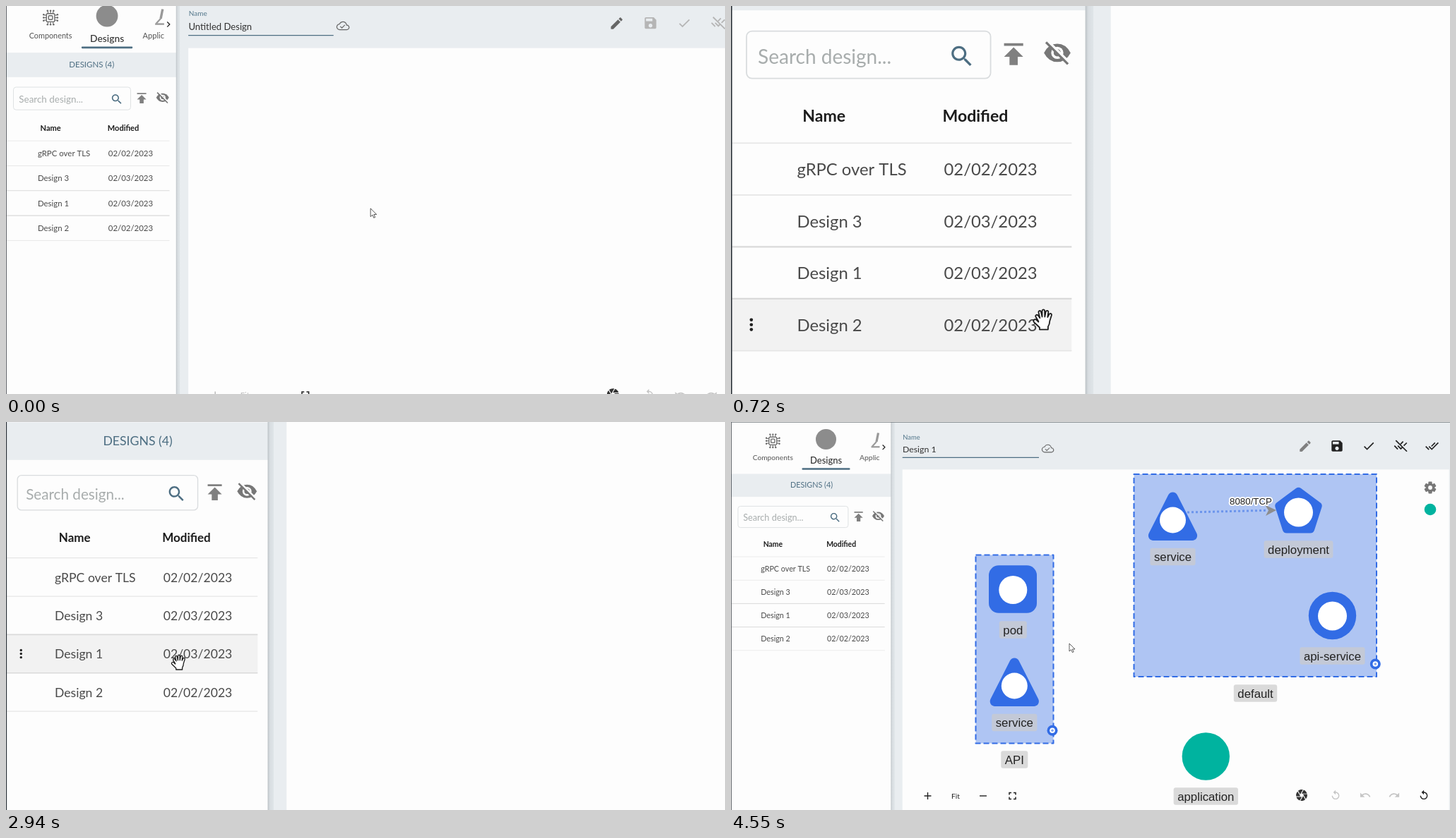
Write an HTML page with a canvas that moves like this. It is 1018 px wide and 550 px high and loops after 4610 ms.

```html
<!DOCTYPE html>
<html lang="en">
<head>
<meta charset="utf-8">
<title>Opening a design</title>
<style>
html, body { margin: 0; width: 100%; height: 100%; overflow: hidden; background: #fdfdfd; }
canvas { display: block; width: 1018px; height: 550px; }
</style>
</head>
<body>
<canvas id="stage" width="1018" height="550"></canvas>
<script>
const ctx = document.getElementById('stage').getContext('2d');
const LOOP = 4610, MAX_ZOOM = 2.288, PIVOT_Y = 188.3, LOADED_AT = 3880;
const SANS = 'Lato, sans-serif', ARIAL = '"Liberation Sans", Arial, sans-serif';
const DARK = '#222', FADED = '#c6c6c6', SLATE = '#4d6e82', BAND = '#e9edf0', BLUE = '#326ce5', TEAL = '#00b39f';

// Icons on a 24 unit grid
const icons = {
  search: 'M15.5 14h-.79l-.28-.27C15.41 12.59 16 11.11 16 9.5 16 5.91 13.09 3 9.5 3S3 5.91 3 9.5 5.91 16 9.5 16c1.61 0 3.09-.59 4.23-1.57l.27.28v.79l5 4.99L20.49 19l-4.99-5zm-6 0C7.01 14 5 11.99 5 9.5S7.01 5 9.5 5 14 7.01 14 9.5 11.99 14 9.5 14z',
  publish: 'M5 4v2h14V4H5zm0 10h4v6h6v-6h4l-7-7-7 7z',
  save: 'M17 3H5c-1.11 0-2 .9-2 2v14c0 1.1.89 2 2 2h14c1.1 0 2-.9 2-2V7l-4-4zm-5 16c-1.66 0-3-1.34-3-3s1.34-3 3-3 3 1.34 3 3-1.34 3-3 3zm3-10H5V5h10v4z',
  edit: 'M3 17.25V21h3.75L17.81 9.94l-3.75-3.75L3 17.25zM20.71 7.04c.39-.39.39-1.02 0-1.41l-2.34-2.34c-.39-.39-1.02-.39-1.41 0l-1.83 1.83 3.75 3.75 1.83-1.83z',
  check: 'M9 16.17 4.83 12l-1.42 1.41L9 19 21 7l-1.41-1.41z',
  checkAll: 'M18 7l-1.41-1.41-6.34 6.34 1.41 1.41L18 7zm4.24-1.41L11.66 16.17 7.48 12l-1.41 1.41L11.66 19l12-12-1.42-1.41zM.41 13.41L6 19l1.41-1.41L1.83 12 .41 13.41z',
  uncheckAll: 'M4.84 1.98L3.43 3.39l10.38 10.38-1.41 1.41-4.24-4.24-1.41 1.41 5.66 5.66 2.83-2.83 6.6 6.6 1.41-1.41L4.84 1.98zM18.05 12.36L23 7.4 21.57 6l-4.94 4.94 1.42 1.42zm-1.06-7.08l-1.41-1.41-4.24 4.24 1.41 1.41 4.24-4.24zM1.08 12.35l5.66 5.66 1.41-1.41-5.66-5.66-1.41 1.41z',
  undo: 'M12.5 8c-2.65 0-5.05.99-6.9 2.6L2 7v9h9l-3.62-3.62c1.39-1.16 3.16-1.88 5.12-1.88 3.54 0 6.55 2.31 7.6 5.5l2.37-.78C21.08 11.03 17.15 8 12.5 8z',
  replay: 'M12 5V1L7 6l5 5V7c3.31 0 6 2.69 6 6s-2.69 6-6 6-6-2.69-6-6H4c0 4.42 3.58 8 8 8s8-3.58 8-8-3.58-8-8-8z',
  expand: 'M7 14H5v5h5v-2H7v-3zm-2-4h2V7h3V5H5v5zm12 7h-3v2h5v-5h-2v3zM14 5v2h3v3h2V5h-5z',
  plus: 'M19 13h-6v6h-2v-6H5v-2h6V5h2v6h6v2z',
  minus: 'M19 13H5v-2h14v2z',
  chevron: 'M10 6 8.59 7.41 13.17 12l-4.58 4.59L10 18l6-6z',
  shutter: 'M9.4 10.5l4.77-8.26C13.47 2.09 12.75 2 12 2c-2.4 0-4.6.85-6.32 2.25l3.66 6.35.06-.1zM21.54 9c-.92-2.92-3.15-5.26-6-6.34L11.88 9h9.66zm.26 1h-7.49l.29.5 4.76 8.25C21 16.97 22 14.61 22 12c0-.69-.07-1.35-.2-2zM8.54 12l-3.9-6.75C3.01 7.03 2 9.39 2 12c0 .69.07 1.35.2 2h7.49l-1.15-2zm-6.08 3c.92 2.92 3.15 5.26 6 6.34L12.12 15H2.46zm11.27 0l-3.9 6.76c.7.15 1.42.24 2.17.24 2.4 0 4.6-.85 6.32-2.25l-3.66-6.35-.93 1.6z',
  cloud: 'M19.35 10.04C18.67 6.59 15.64 4 12 4 9.11 4 6.6 5.64 5.35 8.04 2.34 8.36 0 10.91 0 14c0 3.31 2.69 6 6 6h13c2.76 0 5-2.24 5-5 0-2.64-2.05-4.78-4.65-4.96zM19 18.5H6c-2.5 0-4.5-2-4.5-4.5 0-2.3 1.7-4.2 4-4.45l.8-.1.4-.75C7.7 6.7 9.7 5.5 12 5.5c2.8 0 5.3 2 5.8 4.8l.2 1.2 1.2.1c1.8.1 3.2 1.6 3.2 3.4 0 2-1.5 3.5-3.4 3.5zm-9-3.6l-2.4-2.4-1 1L10 17l6-6-1-1z'
};
for (const name in icons) icons[name] = new Path2D(icons[name]);

const hand = new Path2D('M4.8 9.2L3 6.2C2.2 5 3.6 4 4.5 5L5.8 6.8 4.9 3C4.6 1.6 6.2 1.2 6.6 2.5L7.4 6V2C7.4.5 9.2.5 9.2 2L9.3 6 10 2.4C10.4 1.1 12 1.5 11.8 2.8L11.3 6.3 12.4 4.2C13 3.1 14.5 3.8 14 5.2L12.8 9C12.7 11 12.4 12 11.6 13V15H5.6V13.6L1.6 9.8C.6 8.5 2.2 7.2 3.3 8.1L4.8 9.6Z');
const arrow = new Path2D('M0 0V11L2.6 8.7 4.3 12.6 6.1 11.8 4.4 8H8Z');

// Pointer track: time, x, y
const track = [
  [0, 485.4, 281], [120, 476, 283], [240, 442, 288], [360, 386, 295], [480, 314.4, 301.5],
  [540, 281, 304], [660, 224, 306], [780, 175, 302], [900, 135, 293], [1000, 113, 284],
  [1080, 104.5, 278.5], [1170, 101.4, 276.5], [2787, 101.4, 276.5], [2850, 119, 279],
  [2940, 148.8, 281.4], [3060, 172, 282.8], [3180, 187.5, 283.4], [3310, 209, 284], [3430, 252, 285],
  [3580, 338, 286.5], [3730, 416, 288], [3850, 442, 289], [4040, 460, 299], [4340, 479, 314], [LOOP, 479, 314]
];

function pointerAt(t) {
  const i = Math.max(1, track.findIndex(p => p[0] >= t));
  const [t0, x0, y0] = track[i - 1], [t1, x1, y1] = track[i];
  const k = (t - t0) / (t1 - t0);
  return { x: x0 + (x1 - x0) * k, y: y0 + (y1 - y0) * k };
}

// cubic-bezier(.25, .1, .25, 1)
function ease(x) {
  if (x <= 0) return 0;
  if (x >= 1) return 1;
  const curve = (u, a, b) => 3 * u * (1 - u) ** 2 * a + 3 * u * u * (1 - u) * b + u ** 3;
  let lo = 0, hi = 1;
  for (let i = 0; i < 24; i++) {
    const mid = (lo + hi) / 2;
    if (curve(mid, .25, .25) < x) lo = mid; else hi = mid;
  }
  return curve(lo, .1, 1);
}

const zoomAt = t => 1 + (MAX_ZOOM - 1) * (ease((t + 73) / 1123) - ease((t - 2787) / 520));

function rect(x, y, w, h, fill) {
  ctx.fillStyle = fill;
  ctx.fillRect(x, y, w, h);
}

function disc(x, y, r, fill) {
  ctx.fillStyle = fill;
  ctx.beginPath();
  ctx.arc(x, y, r, 0, 7);
  ctx.fill();
}

function roundBox(x, y, w, h, r, fill, line) {
  ctx.beginPath();
  ctx.roundRect(x, y, w, h, r);
  if (fill) { ctx.fillStyle = fill; ctx.fill(); }
  if (line) { ctx.strokeStyle = line; ctx.stroke(); }
}

// x is the left edge, y the middle of the capitals
function text(str, x, y, size, color, weight = 400, align = 'left', family = SANS) {
  ctx.font = `${weight} ${size}px ${family}`;
  ctx.textAlign = align;
  ctx.fillStyle = color;
  ctx.fillText(str, x, y + size * .36);
}

function icon(name, x, y, size, color, flip = 1) {
  ctx.save();
  ctx.translate(x, y);
  ctx.scale(size / 24 * flip, size / 24);
  ctx.translate(-12, -12);
  ctx.fillStyle = color;
  ctx.fill(icons[name], 'evenodd');
  ctx.restore();
}

function line(x1, y1, x2, y2, color, width) {
  ctx.strokeStyle = color;
  ctx.lineWidth = width;
  ctx.beginPath();
  ctx.moveTo(x1, y1);
  ctx.lineTo(x2, y2);
  ctx.stroke();
}

function hiddenEye(x, y) {
  const gray = '#777';
  ctx.save();
  ctx.translate(x, y);
  ctx.fillStyle = gray;
  ctx.beginPath();
  ctx.moveTo(-8.5, 0);
  ctx.quadraticCurveTo(-5.5, -5.8, 0, -5.8);
  ctx.quadraticCurveTo(5.5, -5.8, 8.5, 0);
  ctx.quadraticCurveTo(5.5, 5.8, 0, 5.8);
  ctx.quadraticCurveTo(-5.5, 5.8, -8.5, 0);
  ctx.fill();
  disc(0, 0, 3.9, '#fdfdfd');
  disc(0, 0, 2.3, gray);
  line(-6.2, -7.8, 7.8, 6.2, '#fdfdfd', 1.6);
  line(-7.2, -6.8, 6.8, 7.2, gray, 1.5);
  ctx.restore();
}

function chip(x, y) {
  ctx.save();
  ctx.translate(x, y);
  ctx.lineWidth = 1.3;
  roundBox(-5.5, -5.5, 11, 11, 1.5, null, '#686868');
  roundBox(-2.6, -2.6, 5.2, 5.2, 1, null, '#686868');
  for (let side = 0; side < 4; side++) {
    ctx.rotate(Math.PI / 2);
    for (const k of [-1, 0, 1]) {
      line(k * 3.4, -5.5, k * 3.4, -8.4, '#686868', 1);
      disc(k * 4, -9.2, 1.2, '#686868');
    }
  }
  ctx.restore();
}

function gear(x, y) {
  ctx.save();
  ctx.translate(x, y);
  for (let i = 0; i < 6; i++) {
    ctx.rotate(Math.PI / 3);
    roundBox(-2.6, -8.4, 5.2, 4, .8, '#777');
  }
  disc(0, 0, 6.3, '#777');
  disc(0, 0, 2.9, '#fdfdfd');
  ctx.restore();
}

function drawPanel(hover, dots) {
  rect(0, 0, 227, 700, '#fdfdfd');
  chip(59.3, 26.8);
  text('Components', 59.3, 50.5, 10.2, '#555', 400, 'center');
  disc(134.5, 24.5, 14.5, '#8c8c8c');
  text('Designs', 134.6, 54.6, 13, '#333', 500, 'center');
  roundBox(100.5, 65.2, 68, 2.6, 1, SLATE);
  line(208.5, 15.5, 206, 28, '#999', 3.2);
  line(206, 28, 200, 34.5, '#999', 2);
  line(198.5, 35.3, 210.5, 35.3, '#999', 2.2);
  text('Applic', 182, 50.5, 10.4, '#555');
  icon('chevron', 216.3, 35.8, 15, '#222');

  rect(0, 73.5, 227, 32.6, BAND);
  text('DESIGNS (4)', 114, 89.6, 10.8, SLATE, 400, 'center');

  ctx.lineWidth = .8;
  roundBox(9.9, 119.4, 156, 30.2, 3.5, null, '#d9dcde');
  text('Search design...', 17.2, 135.8, 12.65, '#a8adad');
  icon('search', 147.5, 135.5, 17.6, SLATE);
  icon('publish', 180.6, 134.1, 21, '#808080');
  hiddenEye(208.5, 133.3);

  text('Name', 45.7, 173.5, 10.4, '#1c1c1c', 700);
  text('Modified', 135.2, 173.5, 10.4, '#1c1c1c', 700);

  const rows = [['gRPC over TLS', '02'], ['Design 3', '03'], ['Design 1', '03'], ['Design 2', '02']];
  rows.forEach(([name, day], i) => {
    const top = 191 + i * 33.2;
    if (i === hover) rect(.7, top, 217, 33.2, '#f2f2f2');
    text(name, 42.2, top + 16.8, 10.75, '#4a4a4a');
    text(`02/${day}/2023`, 136.1, top + 16.8, 10.75, '#4a4a4a');
    if (i === hover && dots)
      for (const k of [-1, 0, 1]) disc(13, top + 16.6 + k * 3.1, 1.05, '#222');
  });
  for (let i = 0; i < 5; i++) {
    const strong = i === 2 || i === 3;
    line(.7, 191 + i * 33.2, 217.7, 191 + i * 33.2, strong ? '#dadada' : '#e6e6e6', strong ? 1 : .8);
  }

  const shade = ctx.createLinearGradient(226.4, 0, 231.8, 0);
  shade.addColorStop(0, '#bcc2c6');
  shade.addColorStop(.35, '#d8dde1');
  shade.addColorStop(.95, '#dfe5e8');
  shade.addColorStop(1, BAND);
  rect(226.4, 0, 5.4, 700, shade);
}

function drawToolbars(loaded) {
  text('Name', 243.3, 21.2, 9.4, '#55788c');
  text(loaded ? 'Design 1' : 'Untitled Design', 243, 39, 12.3, '#333');
  line(242.7, 50.4, 436, 50.4, SLATE, 1.3);
  icon('cloud', 448.6, 37.6, 17.5, '#666');

  const on = loaded ? DARK : '#b5b5b5';
  icon('edit', 813, 34.3, 20.5, loaded ? '#808080' : '#666');
  icon('save', 858, 34, 20.5, on);
  icon('check', 903, 34, 19.5, on);
  icon('uncheckAll', 948, 34, 20.5, on);
  icon('checkAll', 992.5, 34, 19.5, on);

  const zoomInk = loaded ? DARK : '#bbb';
  icon('plus', 278.5, 530, 17, zoomInk);
  text('Fit', 318, 530, 10.3, zoomInk, 400, 'center');
  icon('minus', 357, 530, 17, zoomInk);
  icon('expand', 398.5, 530, 18, DARK);
  icon('shutter', 808, 529, 19, '#333');
  icon('replay', 856, 529, 16, FADED);
  icon('undo', 898, 529, 17, FADED);
  icon('undo', 939, 529, 17, FADED, -1);
  icon('replay', 981, 529, 16, loaded ? DARK : FADED);
  gear(990, 93);
  disc(990, 124, 8.3, TEAL);
}

function group(x, y, w, h) {
  rect(x, y, w, h, '#afc5f3');
  ctx.strokeStyle = BLUE;
  ctx.lineWidth = 2;
  ctx.setLineDash([8, 4]);
  ctx.strokeRect(x, y, w, h);
  ctx.setLineDash([]);
}

function handle(x, y) {
  disc(x, y, 7.5, BLUE);
  disc(x, y, 3.8, '#fff');
  disc(x, y, 1.8, '#7fa3ee');
}

function label(str, x, y) {
  ctx.font = `16.8px ${ARIAL}`;
  const w = ctx.measureText(str).width + 11;
  roundBox(x - w / 2, y - 12.3, w, 24.6, 3, 'rgba(204,204,204,.7)');
  text(str, x, y, 16.8, DARK, 400, 'center', ARIAL);
}

// Filled polygon with rounded corners
function polygon(points, r) {
  const [ax, ay] = points[0], [zx, zy] = points[points.length - 1];
  ctx.beginPath();
  ctx.moveTo((ax + zx) / 2, (ay + zy) / 2);
  points.forEach(([x, y], i) => {
    const [nx, ny] = points[(i + 1) % points.length];
    ctx.arcTo(x, y, (x + nx) / 2, (y + ny) / 2, r);
  });
  ctx.closePath();
  ctx.fillStyle = BLUE;
  ctx.fill();
}

function triangle(x, top) {
  polygon([[x, top - 7], [x + 39, top + 70], [x - 39, top + 70]], 7);
  disc(x, top + 41, 18.5, '#fff');
}

function drawGraph() {
  group(346.5, 188.5, 110, 267);
  group(570.5, 74, 343.5, 287);

  ctx.setLineDash([3, 3]);
  line(646, 128, 760, 125.3, '#6c95ec', 3);
  ctx.setLineDash([]);
  ctx.fillStyle = '#8d8d8d';
  ctx.beginPath();
  for (const [x, y] of [[772, 125], [756, 117.5], [761, 125.2], [757, 133]]) ctx.lineTo(x, y);
  ctx.fill();
  ctx.font = `13.3px ${ARIAL}`;
  ctx.textAlign = 'center';
  ctx.lineJoin = 'round';
  ctx.strokeStyle = '#fff';
  ctx.lineWidth = 4;
  ctx.strokeText('8080/TCP', 736, 117);
  text('8080/TCP', 736, 112.2, 13.3, DARK, 400, 'center', ARIAL);

  roundBox(365, 203.3, 68, 67.5, 14, BLUE);
  disc(399.3, 238, 20, '#fff');
  triangle(401.3, 333);
  triangle(625.5, 98);
  const corners = [0, 1, 2, 3, 4].map(i => {
    const a = i * Math.PI * .4;
    return [803.5 + 36 * Math.sin(a), 128 - 36.5 * Math.cos(a)];
  });
  polygon(corners, 6);
  disc(803.5, 128, 20.5, '#fff');
  disc(851.5, 274.5, 33.7, BLUE);
  disc(851.5, 275, 20.5, '#fff');
  disc(672.3, 474, 33.7, TEAL);

  label('pod', 399.3, 294.5);
  label('service', 401.3, 426);
  label('API', 401.3, 478.5);
  label('service', 625.5, 191);
  label('deployment', 803.5, 180.5);
  label('api-service', 851.5, 331.5);
  label('default', 742.5, 384.5);
  label('application', 672.3, 530.5);
  handle(455, 437.3);
  handle(912.3, 343);
}

function drawPointer(p, grab) {
  ctx.save();
  ctx.translate(p.x, p.y);
  if (grab) {
    ctx.scale(.9, .9);
    ctx.translate(-7.7, -8);
  }
  const shape = grab ? hand : arrow;
  ctx.lineJoin = 'round';
  ctx.lineWidth = grab ? .9 : .7;
  ctx.fillStyle = '#fff';
  ctx.strokeStyle = '#1c1c1c';
  ctx.fill(shape);
  ctx.stroke(shape);
  ctx.restore();
}

function draw(t) {
  const zoom = zoomAt(t), p = pointerAt(t), loaded = t >= LOADED_AT;
  const row = Math.floor((p.y - 191) / 33.2);
  const overRow = p.x < 218 && row >= 0 && row < 4;
  // The opened row stays lit until its design has loaded
  const hover = t > 1170 ? (loaded ? -1 : 2) : overRow ? row : -1;
  const dots = t < 2290 || t >= 2400;

  ctx.setTransform(1, 0, 0, 1, 0, 0);
  rect(0, 0, 1018, 550, BAND);
  ctx.setTransform(zoom, 0, 0, zoom, 0, PIVOT_Y * (1 - zoom));
  rect(242.7, 67.3, 774, 600, '#fdfdfd');
  drawPanel(hover, dots);
  if (t >= LOADED_AT + 30) drawGraph();
  drawToolbars(loaded);
  rect(0, 0, .7, 700, '#2b3138');
  rect(0, 0, 1018, .7, '#6b7176');
  drawPointer(p, overRow);
}

const start = performance.now();
function tick() {
  draw((performance.now() - start) % LOOP);
  requestAnimationFrame(tick);
}
tick();
</script>
</body>
</html>
```
